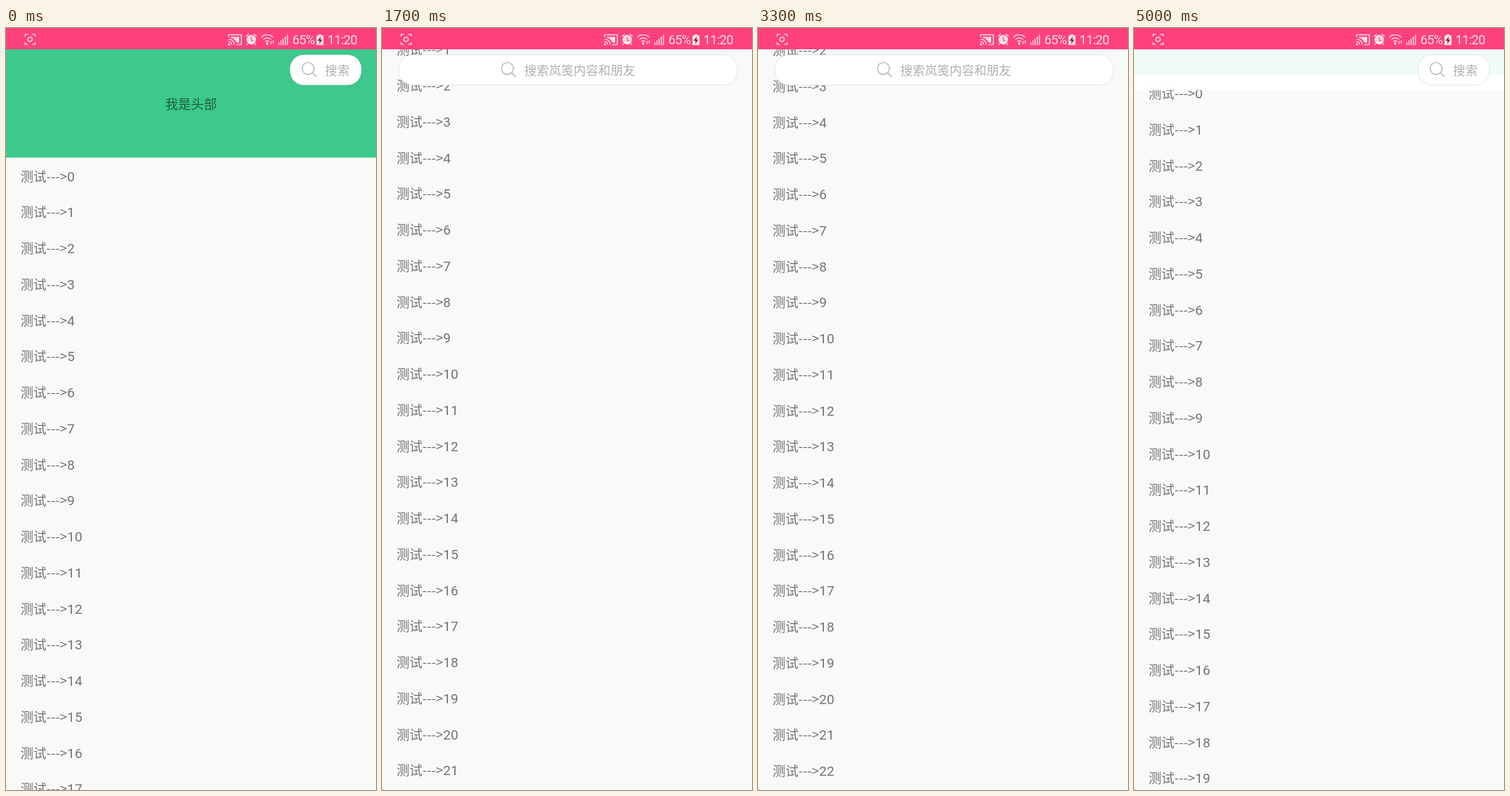
These frames come from a looping animation (522 by 1073 pixels, 5100 ms). An HTML page:

```html
<!DOCTYPE html>
<html lang="zh-CN">
<head>
<meta charset="utf-8">
<style>
  html, body { margin: 0; width: 522px; height: 1073px; overflow: hidden; background: #f8faf8; }
  svg { display: block; }
  text { font: 18.3px "Noto Sans CJK SC", "Noto Sans CJK", sans-serif; fill: rgba(0, 0, 0, .54); white-space: pre; }
  .num { font: 19px Roboto, sans-serif; }
  .status text { font: 18px Roboto, sans-serif; letter-spacing: -.6px; fill: #ffe0ea; }
  .line { fill: none; stroke: #ffd0de; stroke-width: 1.6; }
  .solid { fill: #ffdfe9; }
  #hint { font-size: 17.4px; fill: #b0b0b0; }
  #lens { fill: none; stroke: #b4b4b4; stroke-width: 1.4; stroke-linecap: round; }
</style>
</head>
<body>
<svg width="522" height="1073" viewBox="0 0 522 1073">
  <g id="page">
    <rect y="30" width="522" height="152.5" fill="#3cc98b"/>
    <text x="261" y="114" text-anchor="middle">我是头部</text>
  </g>
  <rect id="toolbar" y="30" width="522" height="57.5" fill="#fff"/>
  <rect id="bar" y="37.5" height="43" rx="20" fill="#fff" stroke="#000" stroke-opacity=".1"/>
  <g id="content">
    <path id="lens" d="M0.8 57a8.4 8.4 0 1 0 16.8 0a8.4 8.4 0 1 0-16.8 0M15.2 63l5.5 5.6"/>
    <text id="hint" x="33" y="66"></text>
  </g>
  <g class="status">
    <rect width="522" height="30" fill="#ff417c"/>
    <path class="line" stroke-width="1.4" d="M27 12V9h4M37 9h4v3M41 20v3h-4M31 23h-4v-3"/>
    <circle class="line" cx="34" cy="16" r="3"/>
    <path class="line" d="M314 12.5V9.5h18v14h-7M314 15.5a8 8 0 0 1 8 8M314 19a4.5 4.5 0 0 1 4.5 4.5"/>
    <path class="solid" d="M317 12.5h12v8h-4a11 11 0 0 0-8-7zM313.3 21.3a3 3 0 0 1 3 3h-3z"/>
    <circle class="solid" cx="346" cy="16.5" r="6.8"/>
    <path class="line" d="M338.5 12l4-3.5M353.5 12l-4-3.5M341 22l-1.5 2M351 22l1.5 2"/>
    <path d="M346 12.5v4.5l3 1.5" fill="none" stroke="#ff417c" stroke-width="1.3"/>
    <path class="line" d="M360.5 13a11 11 0 0 1 16 0M363.2 16.2a7.5 7.5 0 0 1 10.6 0M366 19.2a4 4 0 0 1 5 0"/>
    <circle class="solid" cx="368.5" cy="22" r="1.8"/>
    <path class="line" stroke-width="1.2" d="M374 18.5v4M377 17.5v4"/>
    <path class="line" d="M385 24v-4M388 24v-6.5M391 24v-9M394 24v-12M397 24v-15"/>
    <text x="404" y="23">65%</text>
    <path class="solid" d="M441 9h4v1.5h3V24h-10V10.5h3z"/>
    <path d="M444.5 12l-5 6h3l-1 4.500 5-6h-3z" fill="#7c2445"/>
    <text x="453.500" y="23">11:20</text>
  </g>
</svg>
<script>
const $ = id => document.getElementById(id);
const LOOP = 5100, STEP = 100, PITCH = 50.75, FADE = 126;
const HINT = '搜索岚笺内容和朋友', CHAR = 17.4, ICON = 33, RIGHT = 501.5;

// [time in ms, value]
const scrollKeys = [
  [600, 0], [700, 4], [800, 14], [900, 36], [1000, 78], [1100, 126], [1200, 166],
  [1300, 192], [1500, 219], [1700, 229], [2000, 229], [2100, 120], [2200, 0],
  [2400, 0], [2500, 3], [2600, 12], [2800, 50], [3000, 133], [3200, 245],
  [3300, 279], [3400, 296], [3500, 300], [3600, 292], [3800, 225], [3900, 165],
  [4000, 90], [4100, 30], [4200, 0], [4500, 0], [4600, 4], [4700, 14], [4800, 40],
  [4900, 78], [5000, 116.5]
];
const widthKeys = [
  [1100, 101], [1200, 196], [1300, 384], [1400, 478], [2100, 478], [2200, 280],
  [2300, 127.5], [2400, 101], [3000, 101], [3100, 196], [3200, 384], [3300, 478],
  [4200, 478], [4300, 220], [4400, 127.5], [4500, 101]
];

function valueAt(keys, t) {
  const i = keys.findIndex(k => k[0] >= t);
  if (i < 0) return keys[keys.length - 1][1];
  if (i === 0) return keys[0][1];
  const [t0, a] = keys[i - 1], [t1, b] = keys[i];
  return a + (b - a) * (t - t0) / (t1 - t0);
}

let rows = '';
for (let i = 0; i < 26; i++)
  rows += `<text x="20.5" y="${215.7 + i * PITCH}">测试---&gt;<tspan class="num">${i}</tspan></text>`;
$('page').insertAdjacentHTML('beforeend', rows);

function draw(t) {
  const scroll = valueAt(scrollKeys, t), width = valueAt(widthKeys, t);
  $('page').setAttribute('transform', `translate(0 ${-scroll})`);
  $('toolbar').setAttribute('opacity', scroll < FADE ? scroll / FADE : 0);
  $('bar').setAttribute('x', RIGHT - width);
  $('bar').setAttribute('width', width);
  // The hint shows as many characters as fit and stays centred.
  const count = Math.min(HINT.length, Math.floor((width - 23 - ICON) / CHAR));
  const left = RIGHT - width / 2 - (ICON + count * CHAR) / 2;
  $('hint').textContent = HINT.slice(0, count);
  $('content').setAttribute('transform', `translate(${left} 0)`);
}

const start = performance.now();
function tick() {
  const t = (performance.now() - start) % LOOP;
  draw(Math.floor(t / STEP) * STEP);
  requestAnimationFrame(tick);
}
tick();
</script>
</body>
</html>
```
